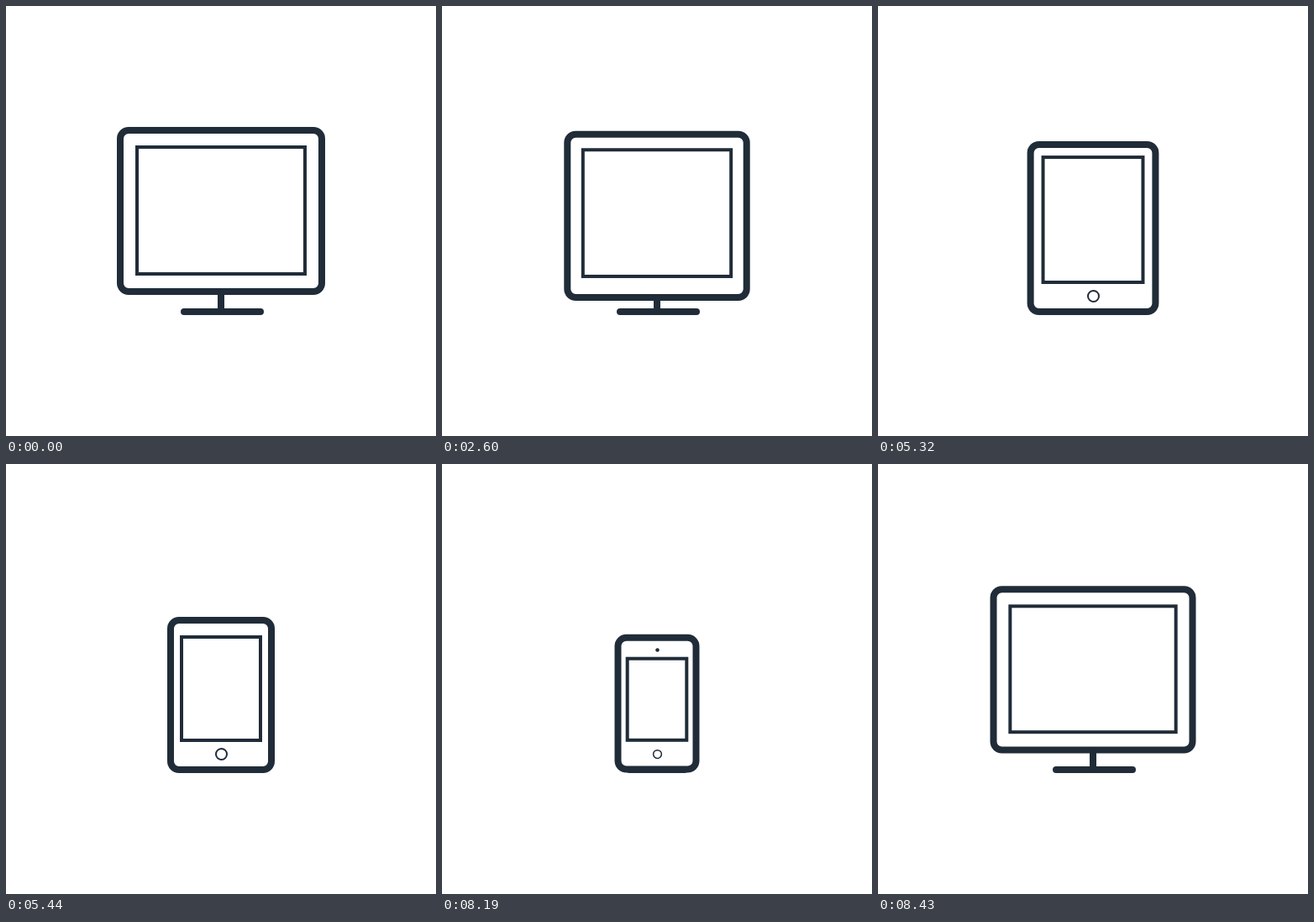
An HTML page for the animation above (8460 ms loop, 512 px wide and 512 px high).

```html
<!DOCTYPE html>
<html lang="en">
<head>
<meta charset="utf-8">
<title>Responsive devices</title>
<style>
  html, body { margin: 0; width: 100%; height: 100%; overflow: hidden; background: #fff; }
  svg { display: block; width: 100%; height: 100%; }
  .line { fill: none; stroke: #202c38; }
  .solid { fill: #202c38; }
</style>
</head>
<body>
<svg viewBox="0 0 512 512">
  <rect id="neck" class="solid" x="252" width="8"/>
  <rect id="base" class="solid" y="360" height="8" rx="4"/>
  <rect id="body" class="line" stroke-width="8" rx="10"/>
  <rect id="screen" class="line" stroke-width="4"/>
  <circle id="button" class="line" stroke-width="2" r="6.5"/>
  <circle id="camera" class="solid" r="2.6"/>
</svg>
<script>
const LOOP = 8460, STEP = 30;
const $ = id => document.getElementById(id);
const [neck, base, body, screen, button, camera] =
  ['neck', 'base', 'body', 'screen', 'button', 'camera'].map($);

// Outer edges (left, top, right, bottom) of the body, then of the screen
const monitor = [132, 144, 380, 344, 154, 166, 358, 321];
const tablet = [177, 160, 335, 368, 194, 177, 318, 331];
const phone = [207, 204, 305, 368, 220, 231, 292, 331];

const clamp = v => Math.min(1, Math.max(0, v));
const inOut = p => p < 0.5 ? 2 * p * p : 1 - 2 * (1 - p) ** 2;

function bezier(x1, y1, x2, y2) {
  const at = (a, b, u) => 3 * a * u * (1 - u) ** 2 + 3 * b * u * u * (1 - u) + u ** 3;
  return x => {
    let lo = 0, hi = 1;
    for (let i = 0; i < 24; i++) {
      const mid = (lo + hi) / 2;
      if (at(x1, x2, mid) < x) lo = mid; else hi = mid;
    }
    return at(y1, y2, (lo + hi) / 2);
  };
}

const moves = [
  { start: 2420, time: 900, from: monitor, to: tablet, ease: bezier(0.25, 0.1, 0.25, 1) },
  { start: 5290, time: 300, from: tablet, to: phone, ease: inOut },
  { start: 8160, time: 300, from: phone, to: monitor, ease: inOut }
];

function set(el, attrs) {
  for (const key in attrs) el.setAttribute(key, attrs[key]);
}

function frame(el, [l, t, r, b], w) {
  set(el, { x: l + w / 2, y: t + w / 2, width: r - l - w, height: b - t - w });
}

function scale(el, x, y, s) {
  set(el, { transform: `translate(${x} ${y}) scale(${s})`, visibility: s > 0 ? 'visible' : 'hidden' });
}

function draw(now) {
  const ms = now % LOOP;
  let pose = monitor, t = 0;
  for (const m of moves) {
    if (ms < m.start) break;
    t = m.start + Math.floor((ms - m.start) / STEP) * STEP;
    const k = m.ease(clamp((t - m.start) / m.time));
    pose = m.from.map((v, i) => v + (m.to[i] - v) * k);
  }
  frame(body, pose.slice(0, 4), 8);
  frame(screen, pose.slice(4), 4);

  // The body's lower edge swallows the stand on its way down
  const [left, , right, bottom] = pose;
  const x1 = Math.max(208, left + 14), x2 = Math.min(307, right - 14);
  const shown = bottom < 367.9 ? 'visible' : 'hidden';
  set(neck, { y: bottom - 4, height: Math.max(0, 364 - bottom + 4), visibility: shown });
  set(base, { x: x1, width: x2 - x1, visibility: shown });

  const leave = clamp((t - 8160) / 120);
  scale(button, 256.5, 345.5, inOut(clamp((t - 2960) / 240)) * (1 - leave));
  scale(camera, 256.5, 221.5, inOut(clamp((t - 5470) / 120)) * (1 - inOut(leave)));
}

const begin = performance.now();
function tick() {
  draw(performance.now() - begin);
  requestAnimationFrame(tick);
}
tick();
</script>
</body>
</html>
```
